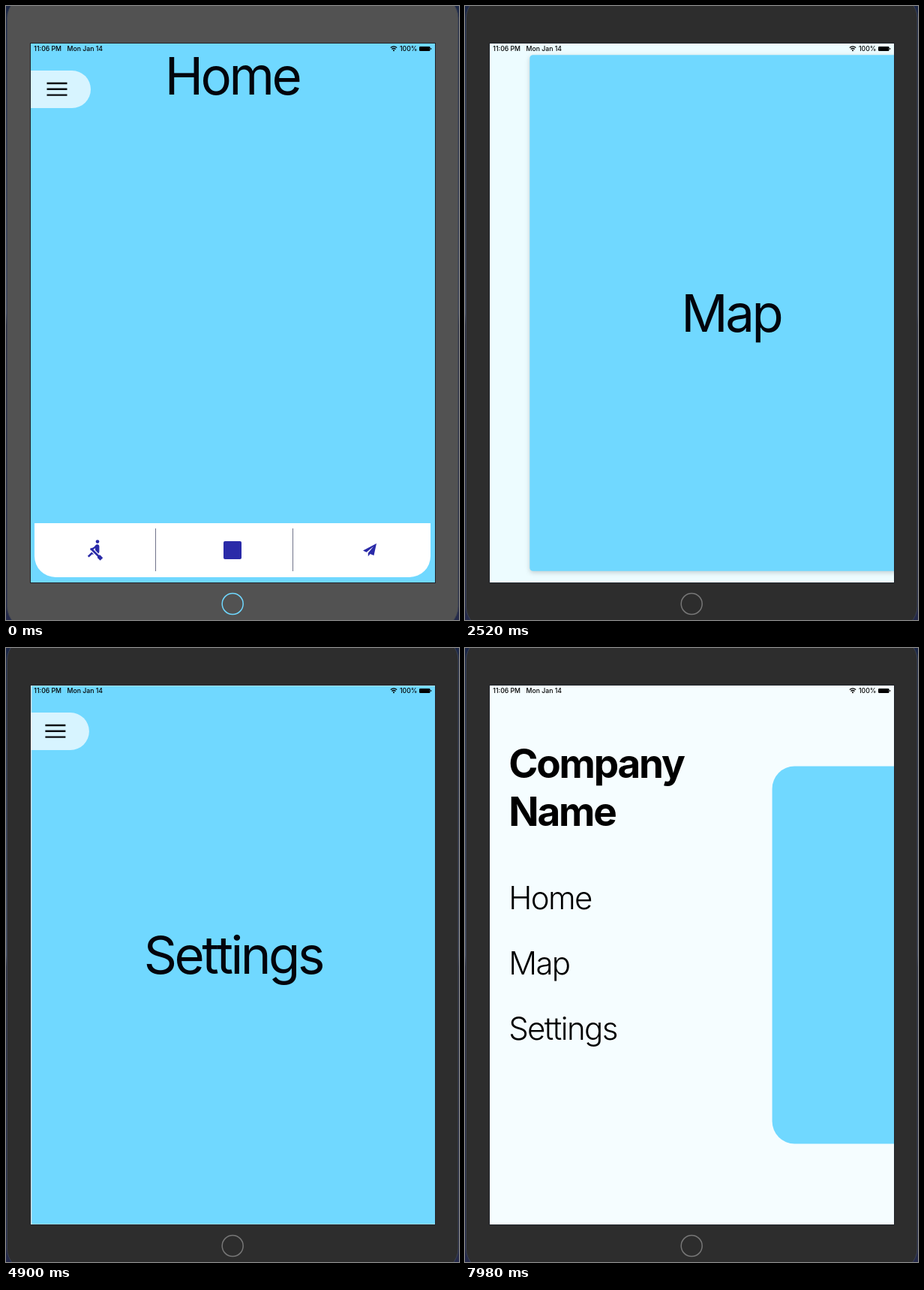
These frames come from a looping animation (604x818 px, 8000 ms). An HTML page:

```html
<!DOCTYPE html>
<html lang="en">
<head>
<meta charset="utf-8">
<title>Drawer menu</title>
<style>
html, body { margin: 0; width: 100%; height: 100%; overflow: hidden; background: #1b2747; }
svg { display: block; width: 604px; height: 818px; }
text { font-family: Inter, "Liberation Sans", sans-serif; font-optical-sizing: none; white-space: pre; }
.status text { font-size: 8.7px; font-weight: 500; }
.page { font-size: 69px; letter-spacing: -.05em; text-anchor: middle; fill: #02040c; }
.brand { font-size: 53px; font-weight: 700; letter-spacing: -.041em; }
.item { font-size: 42px; font-weight: 300; letter-spacing: -.038em; }
</style>
</head>
<body>
<svg viewBox="0 0 604 818">
  <defs>
    <clipPath id="screen"><rect x="33" y="50" width="539" height="718"/></clipPath>
    <linearGradient id="edge" x2="0" y2="1">
      <stop stop-color="#1b2747"/><stop offset=".5" stop-color="#4c556c"/>
      <stop offset=".52" stop-color="#2b2d40"/><stop offset="1" stop-color="#24294a"/>
    </linearGradient>
  </defs>
  <rect width="604" height="818" fill="url(#edge)"/>
  <rect id="bezel" x="1.5" y="-14" width="601.5" height="844" rx="30" stroke="#3a4152"/>
  <rect x="32.5" y="49.5" width="540" height="719" fill="none" stroke="#20242a"/>
  <circle id="button" cx="302.2" cy="796.5" r="14" fill="none" stroke-width="1.5"/>

  <g clip-path="url(#screen)">
    <rect id="back" x="33" y="50" width="539" height="718"/>
    <g id="menu">
      <text class="brand" y="173">Company</text>
      <text class="brand" y="237">Name</text>
      <text class="item" y="348">Home</text>
      <text class="item" y="435">Map</text>
      <text class="item" y="522">Settings</text>
    </g>
    <rect id="card" width="539" fill="#70d8ff"/>
    <text id="label" class="page"></text>
    <g id="tabs">
      <path id="bar" d="M38 689H566V733a28 28 0 0 1-28 28H66a28 28 0 0 1-28-28z"/>
      <path d="M199.5 696V753M382.5 696V753" stroke="#70748a"/>
      <g fill="#2a2aa8">
        <path transform="translate(104 710) scale(1.2)" d="M8.5 14.5L4 19l1.5 1.5L9 17h2zM15 1a2 2 0 1 0 0 4a2 2 0 1 0 0-4zM21 21L18 24l-3-3v-1.5l-7.1-7.1L7 12.5v-2.2c1.7 0 3.6-.9 4.7-2l1.4-1.6c.4-.5 1-.7 1.7-.7C16 6 17 7 17 8.3V14c0 .8-.4 1.6-.9 2.2l-3.6-3.6v-2.3c-.6.5-1.4 1-2.3 1.4L16.5 18H18z"/>
        <rect x="290" y="713" width="24" height="24" rx="2"/>
        <path d="M494 716L476 725.5l4.6 2.2L490 720l-7.2 8.8v4.4l2.8-3.2 4.9 2z"/>
      </g>
    </g>
    <g id="pill">
      <path d="M20 86H88a25 25 0 0 1 0 50H20z" fill="#fff" fill-opacity=".72"/>
      <path d="M54.5 103H81.5M54.5 110.8H81.5M54.5 118.6H81.5" stroke="#0a0d10" stroke-width="2.4"/>
    </g>
    <g class="status">
      <text x="37.3" y="60">11:06 PM</text>
      <text x="81.5" y="60">Mon Jan 14</text>
      <text x="525" y="60">100%</text>
      <g fill="none" stroke="#000" stroke-width="1.3">
        <path d="M512.8 55.6q4.2-3.6 8.4 0M514.4 57.6q2.6-2.2 5.2 0"/>
      </g>
      <circle cx="517" cy="59.3" r="1"/>
      <rect x="551" y="54" width="14.5" height="6" rx="1.3"/>
      <rect x="566.2" y="56" width="1" height="2"/>
    </g>
  </g>
</svg>
<script>
const LOOP = 8000, RATE = .0125;
const $ = id => document.getElementById(id);
// Each move: start time, drawer target, page shown from then on
const moves = [
  [0, 0, 'Home'], [1101, 1, 'Home'], [2245, 0, 'Map'], [3451, 1, 'Map'],
  [4275, 0, 'Settings'], [5474, 1, 'Settings'], [6500, 0, 'Map'], [7300, 1, 'Map']
];
const set = (id, attrs) => {
  for (const k in attrs) $(id).setAttribute(k, attrs[k]);
};
const shift = (id, x, y = 0) => set(id, { transform: `translate(${x} ${y})` });
const mix = (a, b, p) => Math.round(a + (b - a) * p);

// Critically damped spring from 0 to 1
const spring = ms => 1 - (1 + RATE * ms) * Math.exp(-RATE * ms);

function draw(t) {
  const [start, target, page] = moves.filter(m => m[0] <= t).pop();
  const s = start ? spring(t - start) : 1;
  const p = target ? s : 1 - s;
  const left = 377.3 * p, inset = 107.7 * p;
  const early = t < 980, home = page === 'Home';

  set('bezel', { fill: early ? '#525252' : '#2d2d2d' });
  set('button', { stroke: early ? '#70d8ff' : '#777' });
  set('bar', { fill: early ? '#fff' : '#f5fdff' });
  set('back', { fill: `rgb(${mix(236, 245, p)},${mix(252, 253, p)},255)` });
  set('card', { x: 33 + left, y: 50 + inset, height: 718 - 2 * inset, rx: 30 * p });
  $('card').style.filter = `drop-shadow(0 2px 3px rgba(0,0,0,${.22 * (1 - p)}))`;
  set('label', { x: 301.5 + left, y: home ? 118 + inset : 434 });
  $('label').textContent = page;
  set('tabs', { visibility: home ? 'visible' : 'hidden' });
  shift('tabs', left, -inset);
  shift('menu', 59.2 - 539 * (1 - p));
  shift('pill', -600 * p);
}

function tick() {
  draw(performance.now() % LOOP);
  requestAnimationFrame(tick);
}
tick();
</script>
</body>
</html>
```
